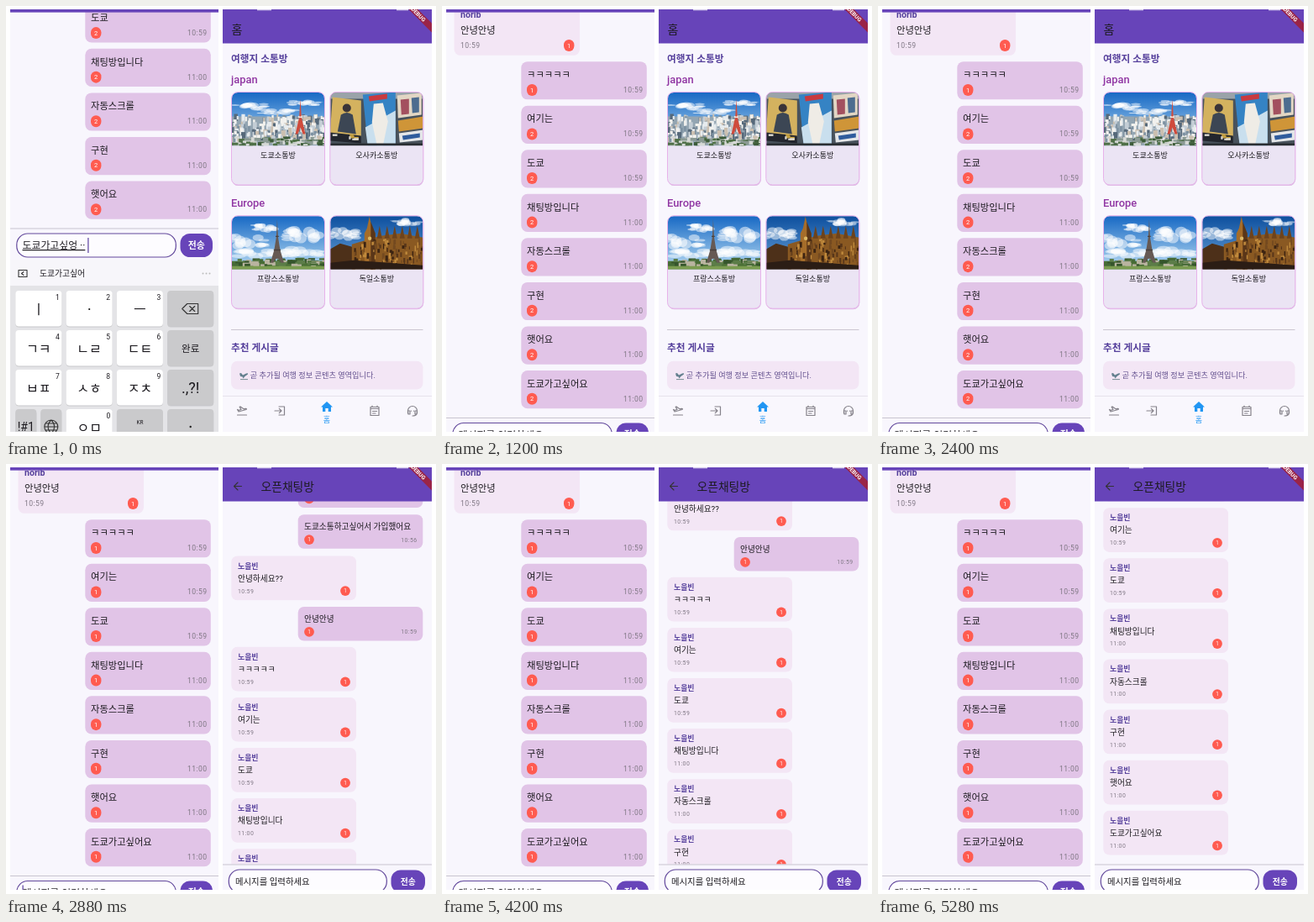
Recreate the animation shown at these times as an HTML page. Size 512 by 512 pixels, loop 5.4 s.

```html
<!DOCTYPE html>
<html lang="ko">
<head>
<meta charset="utf-8">
<style>
html, body { margin: 0; width: 100%; height: 100%; overflow: hidden; background: #fff; }
svg { display: block; width: 100vw; height: 100vh; }
text { font-family: Roboto, "Noto Sans CJK KR", "Noto Sans CJK", sans-serif; fill: #1d1b20; }
.b { font-weight: 700; }
.mid { text-anchor: middle; }
.end { text-anchor: end; }
.white { fill: #fff; }
.name { fill: #56409c; font-weight: 700; }
.region { fill: #9036a3; font-weight: 500; }
.info { fill: #64518f; }
.active { fill: #2196f3; }
.time { fill: #807885; letter-spacing: .4px; }
.line { fill: none; stroke: #85828a; stroke-width: 1.2; stroke-linecap: round; stroke-linejoin: round; }
.dark { stroke: #333; stroke-width: 1.1; }
</style>
</head>
<body>
<svg id="stage" viewBox="0 0 512 512"></svg>
<script>
const BG = '#f8f6fd', PURPLE = '#6744b9', OWN = '#e1c4e7', OTHER = '#f3e6f5', RED = '#ff5b50';
const LOOP = 5400, TICK = 120, PITCH = 52.55;

const txt = (x, y, s, size, cls = '') =>
  `<text x="${x}" y="${y}" font-size="${size}" class="${cls}">${s}</text>`;
const rect = (x, y, w, h, fill, r = 0, more = '') =>
  `<rect x="${x}" y="${y}" width="${w}" height="${h}" rx="${r}" fill="${fill}" ${more}/>`;
const circ = (x, y, r, fill) => `<circle cx="${x}" cy="${y}" r="${r}" fill="${fill}"/>`;
const path = (d, fill) => `<path d="${d}" fill="${fill}"/>`;
const icon = (x, y, d, cls = '') => `<path class="line ${cls}" transform="translate(${x} ${y})" d="${d}"/>`;
const group = (id, body) => `<g id="${id}">${body}</g>`;
const clip = (id, x, y, w, h, r = 0) => `<clipPath id="${id}">${rect(x, y, w, h, '#000', r)}</clipPath>`;
const grad = (id, a, b) => `<linearGradient id="${id}" x2="0" y2="1"><stop stop-color="${a}"/>` +
  `<stop offset="1" stop-color="${b}"/></linearGradient>`;

let seed = 7;
const rnd = () => (seed = seed * 16807 % 2147483647) / 2147483647;

// Left phone: chat
const said = ['ㅋㅋㅋㅋㅋ', '여기는', '도쿄', '채팅방입니다', '자동스크롤', '구현', '햇어요', '도쿄가고싶어요'];
const stamp = i => i < 3 ? '10:59' : '11:00';

const pill = (x, y, n, cls = '') => rect(x - 6, y - 7, 12.4, 14, RED, 6.2) + txt(x + .2, y + 2.7, n, 7.5, 'mid white ' + cls);

function ownLeft(s, i) {
  const y = i * PITCH;
  return `<g class="own">${rect(94.3, y, 149.5, 45.2, OWN, 7.5)}${txt(101, y + 19.8, s, 11.3)}
    ${pill(107, y + 33.8, 1, i ? 'count' : '')}${txt(239.5, y + 36.8, stamp(i), 8.6, 'time end')}</g>`;
}
const otherLeft = rect(14.5, -67, 149.5, 59.7, OTHER, 7.5) + txt(22, -52, 'norib', 10.6, 'name') +
  txt(22, -32.8, '안녕안녕', 11.3) + txt(22, -15.8, '10:59', 8.6, 'time') + pill(151, -19.2, 1);

const field = (x, y, w, h) => rect(x, y, w, h, '#fdfcff', 13, 'stroke="#62489c" stroke-width="1.2"');
const inputBar = rect(5, 0, 248, 250, BG) + rect(5, 0, 248, 1, '#c9c5cf') + field(12.8, 6.5, 189.5, 28) +
  txt(19.5, 24.5, '메시지를 입력하세요', 11.9, 'hint') +
  '<text id="draft" x="19.5" y="24.5" font-size="11.9" text-decoration="underline"></text>' +
  '<rect id="caret" y="11.5" width="1.2" height="18" fill="#5b3fa0"/>' +
  rect(207.5, 6.5, 38.5, 28, PURPLE, 11.5) + txt(226.8, 24.4, '전송', 10.9, 'mid b white');

// Keyboard
const GRAY = '#cacacc';
const colX = c => 11.3 + c * 60.3, rowY = r => 339 + r * 47;
const key = (c, r, fill, w = 55, dx = 0) => rect(colX(c) + dx, rowY(r) + 1, w, 42.5, '#c8c8cb', 4) +
  rect(colX(c) + dx, rowY(r), w, 42.5, fill, 4);
const letters = ['ㅣ', '', 'ㅡ', 'ㄱㅋ', 'ㄴㄹ', 'ㄷㅌ', 'ㅂㅍ', 'ㅅㅎ', 'ㅈㅊ'];

function keyboard() {
  let s = rect(5, 302, 248, 32, '#f7f6fa') + rect(5, 333, 248, 210, '#e4e4e7');
  letters.forEach((l, i) => {
    const c = i % 3, r = i / 3 | 0;
    s += key(c, r, '#fff') + txt(colX(c) + 27.5, rowY(r) + 28, l, 16, 'mid') +
      txt(colX(c) + 50, rowY(r) + 10.5, i + 1, 8.5, 'mid');
  });
  s += circ(99.2, 361, 1.1, '#111');
  for (let r = 0; r < 4; r++) s += key(3, r, GRAY);
  s += icon(219.7, 360.5, 'M-10 0L-4 -6H9V6H-4ZM-1 -3L5 3M5 -3L-1 3', 'dark') +
    txt(219.7, 411.5, '완료', 11.5, 'mid') + txt(219.7, 461, '.,?!', 18, 'mid') + circ(219.7, 501, 1.2, '#222');
  s += key(0, 3, GRAY, 25) + key(0, 3, GRAY, 25, 30) + txt(23.8, 506, '!#1', 14, 'mid') +
    icon(53.8, 501, 'M-8 0A8 8 0 1 1 8 0A8 8 0 1 1 -8 0H8M0 -8C-5 -3 -5 3 0 8C5 3 5 -3 0 -8M-7 -4H7M-7 4H7', 'dark');
  s += key(1, 3, '#fff') + txt(99.2, 508, 'ㅇㅁ', 16, 'mid') + txt(122, 490.5, 0, 8.5, 'mid');
  return s + key(2, 3, GRAY) + txt(159.5, 497.5, 'KR', 6.5, 'mid');
}
const dots = (x, y, fill) => [-4, 0, 4].map(d => circ(x + d, y, 1, fill)).join('');
const suggest = icon(20, 318.5, 'M-5 -4H5V4H-5ZM1 -2L-1.5 0L1 2', 'dark') + txt(40, 321.6, '도쿄가고싶어', 9.8) + dots(238.5, 318.5, '#bbb');
const tools = [23, 59, 95, 131.5, 168, 204.5].map(x => circ(x, 318, 9.5, '#eeedf1')).join('') +
  icon(23, 318, 'M-5 0A5 5 0 1 1 5 0A5 5 0 1 1 -5 0M-2 -1.5V-1M2 -1.5V-1M-2.5 1.5Q0 4 2.5 1.5', 'dark') +
  icon(59, 318, 'M-2 -5H5V2H-2ZM-5 -2V5H2M0 0L1.5 -3.5L3 0', 'dark') +
  icon(95, 318, 'M-4 -4L4 4M-3 1V5M-5 3H-1M3 -5V-1M1 -3H5', 'dark') +
  icon(131.5, 318, 'M-4 -4H4V5H-4ZM-1.5 -5H1.5V-3H-1.5Z', 'dark') +
  icon(168, 318, 'M0 -5L4.5 -2.5V2.5L0 5L-4.5 2.5V-2.5ZM-1.5 0A1.5 1.5 0 1 1 1.5 0A1.5 1.5 0 1 1 -1.5 0', 'dark') +
  `<g opacity=".35">${icon(204.5, 318, 'M-5 -4H2M-1.5 -4V4M1 3L5 -1M1 4H5', 'dark')}</g>` + dots(238.5, 318, '#333');

function ghost() {
  let s = rect(13, 271, 189, 28, '#fff', 13, 'opacity=".45"') + txt(19.5, 289, '메시지를 입력하세요', 11.9, 'b white');
  for (let i = 0; i < 9; i++) s += rect(colX(i % 3), rowY(i / 3 | 0), 55, 42, '#fff', 4, 'opacity=".35"');
  return s;
}

// Photo stand-ins, 111 x 64 each
const fix = v => v.toFixed(1);
const sky = fill => rect(0, 0, 111, 64, fill);

function dabs(n, x, y, w, h, dw, dh, tones) {
  let s = '';
  for (let i = 0; i < n; i++)
    s += rect(fix(x + rnd() * w), fix(y + h * i / n), fix(dw * (.5 + rnd())), fix(dh * (.5 + rnd())), tones[rnd() * tones.length | 0]);
  return s;
}
function cloud(x, y, w, h) {
  let s = '';
  for (let i = 0; i < 16; i++) {
    const u = rnd() * 2 - 1;
    s += `<ellipse cx="${fix(x + u * w)}" cy="${fix(y + (rnd() - .5) * h)}" rx="${fix(w * .3)}" ry="${fix(h * .4 * (1.2 - u * u))}" fill="#fff" opacity=".5"/>`;
  }
  return s;
}

const city = () => sky('url(#sky)') + cloud(22, 17, 20, 6) + cloud(86, 13, 18, 5) + cloud(58, 23, 22, 5) +
  rect(0, 29, 111, 35, '#93a5b2') +
  dabs(240, -3, 26, 114, 30, 3.5, 7, ['#e6ebee', '#c3cdd5', '#7e92a2', '#f3f2ee', '#56697a', '#cbbfb0']) +
  dabs(70, -3, 53, 114, 9, 7, 4, ['#3d5c3a', '#4f7047', '#8b9a94', '#d6d9d6']) +
  path('M82 8L83.3 30L88 50H85L82 42L79 50H76L80.7 30Z', '#cf4b3c') + rect(79.5, 29, 5, 1.6, '#f3e3dc');

const signs = sky('#48525c') + path('M0 0H111V8H0Z', '#9aa3a9') +
  path('M3 6L37 10V53L0 49Z', '#d4b25f') + circ(20, 19, 5, '#3a3438') + path('M9 47L13 27Q20 22 27 27L31 50Z', '#3c4654') +
  path('M0 48L37 52V61L0 58Z', '#23262e') + dabs(9, 3, 50, 28, 6, 4, 3, ['#d9d6cf', '#c6a13f']) +
  path('M39 3L78 0V64H45Z', '#3583c4') + path('M42 42L78 22V64H45Z', '#c9dfee') + path('M46 5L68 2V8L47 11Z', '#c83a3f') +
  path('M52 14L63 13L69 35L63 64H56L50 36Z', '#efece6') +
  path('M80 4L109 1V27L81 31Z', '#e2d6c4') + path('M84 9L94 8V26L85 27Z', '#a3505f') + path('M97 7L106 6V24L98 25Z', '#4d6c8f') +
  path('M81 34L111 29V43L82 47Z', '#cf9538') + path('M82 49L111 45V57L83 60Z', '#e4e6e8') + path('M86 52L107 49V54L87 57Z', '#2f5c9d') +
  rect(0, 61, 111, 3, '#2a2e33');

const paris = () => sky('url(#sky)') + cloud(18, 30, 22, 12) + cloud(88, 24, 24, 14) + cloud(42, 14, 16, 7) + cloud(30, 45, 30, 8) + cloud(84, 44, 28, 9) +
  rect(0, 54, 111, 10, '#4b7036') + dabs(60, -3, 50, 114, 8, 7, 4, ['#35552c', '#456a36', '#5c7d49', '#b9b4a0']) +
  path('M54.4 4L55.4 25L58 41L62.5 56H59Q54.4 46 49.8 56H46.3L50.8 41L53.4 25Z', '#665a54') +
  rect(50.3, 40, 8.2, 1.6, '#4a413e') + rect(52.5, 24, 3.8, 1.3, '#4a413e') + rect(0, 60, 111, 4, '#7b9c50');

function gothic() {
  let s = sky('url(#deep)') + cloud(16, 22, 20, 9) + cloud(92, 8, 16, 6) +
    path('M0 40L12 33L30 38V64H0Z', '#4d3019') + path('M26 34L60 24L84 21L111 26V64H26Z', '#8a5922') +
    path('M41 64V21L44 15L47 1L50 15L54 21V64Z', '#a56d2a') + path('M48.5 7L54 21V64H48.5Z', '#5a3618');
  for (let x = 56; x < 110; x += 9) s += path(`M${x} 27L${x + 3} 12L${x + 6} 27Z`, '#6d431c');
  s += dabs(110, 27, 27, 83, 32, 2, 5, ['#3c2412', '#58361a', '#c08a3c', '#744a20']);
  return s + circ(47.3, 27, 2.2, '#dcb968') + path('M0 56L28 53L111 59V64H0Z', '#2b1d15');
}

// Right phone: home
const card = (x, y, photo, label) => `<g transform="translate(${x} ${y})">` +
  rect(.4, 1.6, 111, 110, '#dcc0e4', 7.5) + rect(0, 0, 111, 110.5, '#ebe4f4', 7.5) +
  `<g clip-path="url(#photo)">${photo}</g>` + rect(0, 0, 111, 110.5, 'none', 7.5, 'stroke="#e7b2ea" stroke-width="1"') +
  txt(55.5, 78.8, label, 9.1, 'mid') + '</g>';

const head = rect(258, 4, 249, 40.5, PURPLE) + rect(299, 4, 17, 1.3, '#fff', 0, 'opacity=".7"') + rect(465, 4, 14, 1.3, '#fff', 0, 'opacity=".7"');
const plane = path('M278 437.5L280 437L282 439.5L286 437.5Q288.5 436.5 288 438.5L284.5 441L282.5 443.5L281.5 441.5L279 441Z', '#64808f') +
  rect(279, 444, 9, 1.1, '#84959d');
const home = rect(258, 4, 249, 503, BG) + head + txt(268.5, 32.5, '홈', 14) +
  txt(268, 67, '여행지 소통방', 11.7, 'name') + txt(268, 92, 'japan', 12.9, 'region') +
  card(268.5, 102.5, city(), '도쿄소통방') + card(385.8, 102.5, signs, '오사카소통방') +
  txt(268, 239.3, 'Europe', 12.9, 'region') +
  card(268.5, 249.7, paris(), '프랑스소통방') + card(385.8, 249.7, gothic(), '독일소통방') +
  rect(268, 385, 228.5, 1, '#cbc6d0') + txt(268, 411.2, '추천 게시글', 11.7, 'name') +
  rect(268, 422.7, 228.5, 33.8, OTHER, 7.5) + plane + txt(290.8, 443, '곧 추가될 여행 정보 콘텐츠 영역입니다.', 9.2, 'info') +
  rect(258, 464, 249, 43, '#f9f7fd') + rect(258, 464, 249, 1, '#e6e2ec') +
  icon(281, 482, 'M-5.5 5H5.5M-5.5 -1.5L-4 1L5 -1.5Q6 -2.3 4.5 -2.7L2 -2.2L-2 -5L-2.8 -4.6L-1 -1.5L-4 -.7Z') +
  icon(326, 482, 'M-1 -5H5.5V5H-1M-6 0H2M-.7 -2.7L2 0L-.7 2.7') +
  path('M382 471L389 477.5H387V483H383.7V479H380.3V483H377V477.5H375Z', '#2196f3') + txt(382, 495.5, '홈', 9, 'mid active') +
  icon(439, 482, 'M-5 -4.5H5V5.5H-5ZM-5 -2.5H5M-3 -6V-4.5M3 -6V-4.5M-2.5 .5H2.5M-2.5 3H1') +
  icon(484, 482, 'M-5.5 3V0A5.5 5.5 0 0 1 5.5 0V3M-5.5 0H-3V4H-5ZM5.5 0H3V4H5ZM5 4Q4 6 0 6M-1.5 0V.2M1.5 0V.2');

// Right phone: open chat
const dot = (x, y) => circ(x, y, 5.9, RED) + txt(x, y + 2.2, 1, 6.3, 'mid white');
const ownRight = (y, s, time) => rect(347.7, y, 148.6, 40.5, OWN, 7) + txt(355, y + 17.7, s, 9.7) +
  dot(361, y + 29.8) + txt(489.5, y + 32.2, time, 6.9, 'time end');
const otherRight = (y, s, time) => rect(268.3, y, 148.7, 52.7, OTHER, 7) + txt(276, y + 15, '노을빈', 8.9, 'name') +
  txt(276, y + 30.2, s, 9.7) + txt(276, y + 44, time, 6.9, 'time') + dot(404, y + 41.6);
const thread = ownRight(11.5, '안녕하세요', '10:56') + ownRight(60.3, '도쿄소통하고싶어서 가입했어요', '10:56') +
  otherRight(109.5, '안녕하세요??', '10:59') + ownRight(170, '안녕안녕', '10:59') +
  said.map((s, i) => otherRight(217.8 + i * 60.1, s, stamp(i))).join('');
const chat = rect(258, 4, 249, 503, BG) + `<g clip-path="url(#threadBox)">${group('thread', thread)}</g>` + head +
  icon(276, 26.5, 'M4.5 0H-4.5M0 -4.5L-4.5 0L0 4.5', 'dark') + txt(303.5, 32, '오픈채팅방', 13.8) +
  rect(258, 476.5, 249, 1, '#c9c5cf') + field(265.3, 483, 188, 27.5) + txt(273, 501, '메시지를 입력하세요', 10.4) +
  rect(458.5, 483.5, 40.5, 27, PURPLE, 11.5) + txt(478.7, 501.3, '전송', 9.8, 'mid b white');

const ribbon = path('M479.5 4H490.5L507 20.5V31.5Z', '#9a2448') +
  `<g transform="translate(491 10) rotate(45)">${txt(0, 2.3, 'DEBUG', 6.6, 'mid b white')}</g>`;

const stage = document.getElementById('stage');
stage.innerHTML = '<defs>' + clip('left', 5, 4, 248, 503) + clip('right', 258, 4, 249, 503) +
  clip('threadBox', 258, 44, 249, 432.5) + `<clipPath id="photo"><path d="M.5 64V7.5Q.5 .5 7.5 .5H103.5Q110.5 .5 110.5 7.5V64Z"/></clipPath>` +
  grad('sky', '#1668c4', '#b9dcf3') + grad('deep', '#0d4f9e', '#6aa3da') + '</defs>' +
  `<g clip-path="url(#left)">${rect(5, 4, 248, 503, BG)}${group('ghost', ghost())}
    ${group('list', otherLeft + said.map(ownLeft).join(''))}${rect(5, 4, 248, 3.6, PURPLE)}
    ${group('bar', inputBar)}${group('keys', keyboard() + group('suggest', suggest) + group('tools', tools))}</g>
  <g clip-path="url(#right)">${home}${group('chat', chat)}${ribbon}</g>`;

const el = id => document.getElementById(id);
const show = (node, on) => node.style.display = on ? '' : 'none';
const move = (id, y) => el(id).setAttribute('transform', `translate(0 ${y})`);
const hint = stage.querySelector('.hint');
const lastOwn = [...stage.querySelectorAll('.own')].pop();
const counts = stage.querySelectorAll('.count');

// Piecewise linear track of [time, value] points
function track(t, pts) {
  let [t0, v0] = pts[0];
  for (const [t1, v1] of pts) {
    if (t < t1) return t <= t0 ? v0 : v0 + (v1 - v0) * (t - t0) / (t1 - t0);
    [t0, v0] = [t1, v1];
  }
  return v0;
}

function render(t) {
  const sent = t >= 240;
  const barY = track(t, [[480, 264.5], [600, 421], [720, 490]]);
  move('bar', barY);
  move('list', barY - 56 - PITCH * (sent ? 7 : 6));
  move('keys', track(t, [[480, 0], [600, 179], [720, 240]]));
  show(lastOwn, sent);
  show(el('keys'), t < 720);
  show(el('suggest'), !sent);
  show(el('tools'), sent);
  show(el('ghost'), t >= 600 && t < 720);

  show(hint, sent);
  el('draft').textContent = sent ? '' : t < 120 ? '도쿄가고싶엉 ··' : '도쿄가고싶어요';
  el('caret').setAttribute('x', sent ? 19.5 : 97.3);
  show(el('caret'), !sent || (t + 400) % 1000 < 500);

  const unread = t < 2880 ? 2 : 1;
  counts.forEach(c => c.textContent = unread);
  el('chat').setAttribute('opacity', track(t, [[2640, 0], [2880, 1]]));
  move('thread', -track(t, [[3240, 0], [4200, 83], [5160, 225.7]]));
}

const start = performance.now();
function loop() {
  const t = (performance.now() - start) % LOOP;
  render(Math.floor(t / TICK) * TICK);
  requestAnimationFrame(loop);
}
loop();
</script>
</body>
</html>
```
